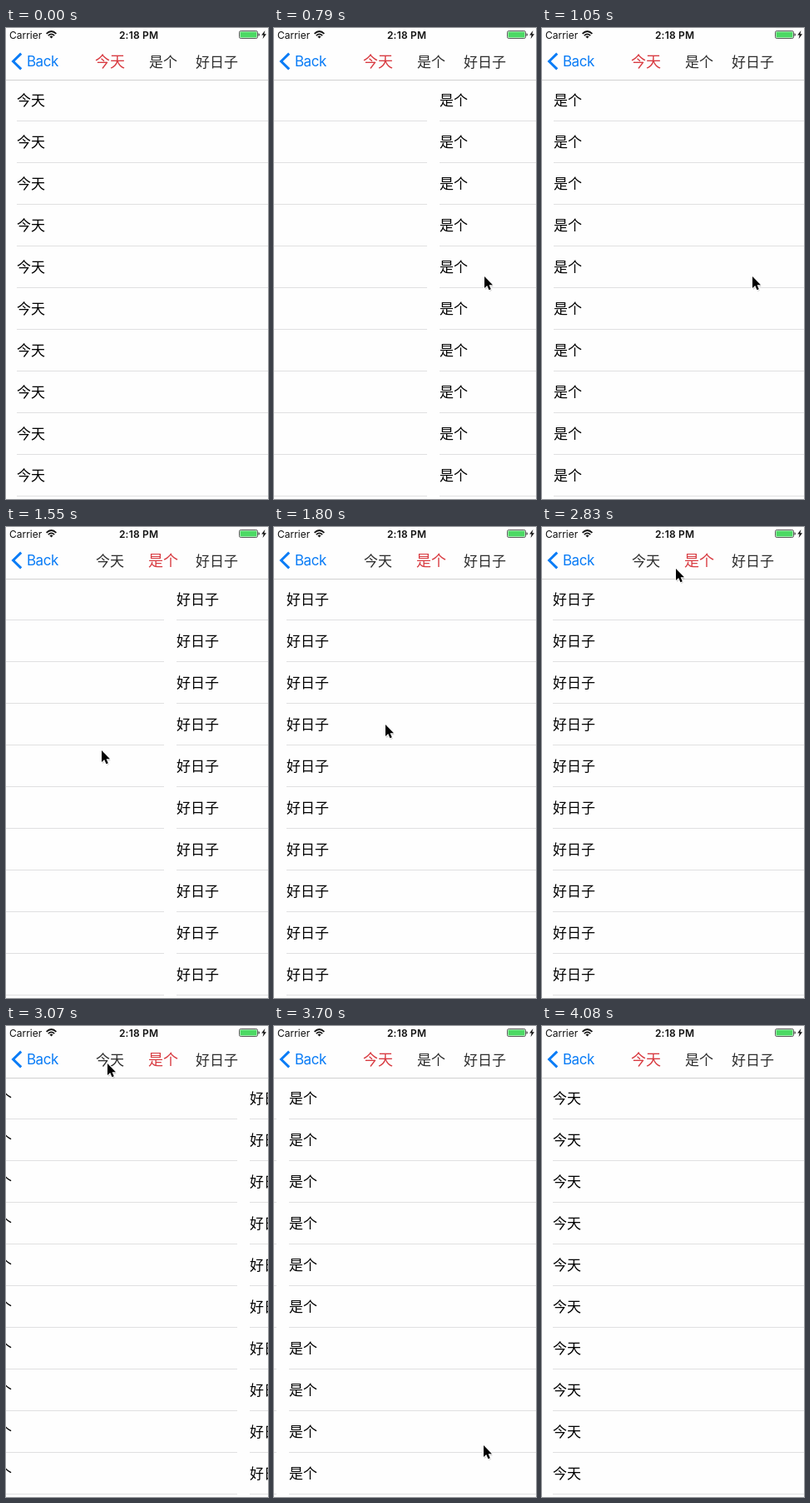
Write an HTML page that moves like this. It is 315x565 px and loops after 4630 ms.

```html
<!DOCTYPE html>
<html lang="zh-CN">
<head>
<meta charset="utf-8">
<title>Paged tabs</title>
<style>
  html, body { margin: 0; width: 100%; height: 100%; overflow: hidden; background: #fefefe; }
  svg { display: block; width: 315px; height: 565px; }
  text { font-family: Inter, Roboto, sans-serif; }
  .status { font-size: 12px; fill: #111; }
  .time { font-weight: 600; text-anchor: middle; letter-spacing: .2px; }
  .back { font-size: 17px; letter-spacing: -.5px; fill: #0a7cf6; }
  .tab, .row { font: 17px "Noto Sans CJK SC", "Noto Sans CJK", sans-serif; }
  .tab { text-anchor: middle; fill: #2d2d2d; }
  .tab.on { font-size: 18px; fill: #d83a40; }
  .rule { fill: #e0e0e1; }
</style>
</head>
<body>
<svg viewBox="0 0 315 565">
  <rect width="315" height="565" fill="#fefefe"/>
  <g id="pages"></g>
  <rect y="62" width="315" height="1" fill="#d0d0d0"/>

  <text class="status" x="4" y="12.5">Carrier</text>
  <g fill="none" stroke="#111" stroke-width="1.7">
    <path d="M48.6 6.8Q54.5 1.2 60.4 6.8"/>
    <path d="M50.8 9.1Q54.5 5.7 58.2 9.1"/>
  </g>
  <path d="M52.4 10.3Q54.5 8.6 56.6 10.3L54.5 12.6Z" fill="#111"/>
  <text class="status time" x="159.6" y="12.5">2:18 PM</text>
  <rect x="280.5" y="3.5" width="22" height="9" rx="1.8" fill="none" stroke="#333" stroke-width=".8"/>
  <rect x="281.5" y="4.5" width="20" height="7" rx=".8" fill="#4cd964"/>
  <path d="M303.5 6.2q1.4 .3 1.4 1.8t-1.4 1.8z" fill="#333"/>
  <path d="M311.4 3L307.2 8.6H309.7L308.6 13L313 7.3H310.4Z" fill="#111"/>

  <path d="M18.2 30.6L8.6 40L18.2 49.4" fill="none" stroke="#0a7cf6" stroke-width="3"/>
  <text class="back" x="25" y="46">Back</text>
  <g id="tabs"></g>

  <g id="cursor">
    <path d="M1 2V16L4 13.6L6.4 18L9 17L7 12.2H11Z" fill="#000" opacity=".16"/>
    <path d="M0 0V14L3.2 11L5.5 16.2L7.8 15.2L5.6 10.2H10Z" fill="#000"
          stroke="#fff" stroke-width="1.8" paint-order="stroke"/>
  </g>
</svg>
<script>
const LOOP = 4630, PAGE = 320, ROWS = 10;
const labels = ["今天", "是个", "好日子"];
const centers = [125, 189, 253.5];
const $ = id => document.getElementById(id);

$("tabs").innerHTML = labels.map((s, i) =>
  `<text class="tab" x="${centers[i]}" y="46.5">${s}</text>`).join("");

$("pages").innerHTML = labels.map((s, i) => {
  let rows = "";
  for (let r = 0; r < ROWS; r++) {
    const y = 62 + 50 * r;
    rows += `<text class="row" x="15" y="${y + 31}">${s}</text>` +
            `<rect class="rule" x="15" y="${y + 49}" width="305" height="1"/>`;
  }
  return `<g transform="translate(${i * PAGE - 2})">${rows}</g>`;
}).join("");

const linear = p => p;
const easeIn = p => p * p;
const easeOut = p => 1 - (1 - p) ** 3;
const easeInOut = p => (1 - Math.cos(Math.PI * p)) / 2;
const hold = () => 0;

// Keyframes: [time, values, easing towards the next key]
const scroll = [
  [0, [0], hold], [620, [0], easeIn], [790, [134], easeOut],
  [1080, [320], hold], [1250, [320], easeIn], [1370, [374], hold],
  [1550, [448], easeOut], [1850, [640], hold],
  [2851, [640], easeInOut], [3135, [320], hold],
  [3677, [320], easeInOut], [3961, [0], hold]
];
const pointer = [
  [0, [330, 390], hold], [90, [311, 382], hold], [150, [308, 382], hold],
  [440, [306, 370], linear], [620, [302, 306], easeIn], [740, [253, 298], hold],
  [1250, [253, 298], easeIn], [1370, [189, 285], hold],
  [1550, [115, 268], hold], [1680, [115, 268], easeInOut],
  [2070, [238, 69], hold], [2100, [232, 67], linear],
  [2210, [161, 50], hold], [2830, [161, 50], easeInOut],
  [3070, [122, 45], hold], [3480, [122, 45], easeInOut],
  [3700, [252, 503], easeOut], [3960, [261, 559], hold],
  [4020, [262, 560], hold], [4080, [330, 600], hold]
];
const active = [
  [0, [0], hold], [1080, [1], hold], [1850, [2], hold],
  [2410, [1], hold], [3270, [0], hold]
];

// Screen refreshes come in bursts: [first, last, count]
const ticks = [0];
for (const [a, b, n] of [
  [90, 150, 2], [440, 790, 9], [820, 960, 3], [990, 1080, 3], [1250, 1370, 4],
  [1550, 1550, 1], [1600, 2070, 14], [2100, 2210, 5], [2410, 2410, 1],
  [2830, 3070, 6], [3130, 3130, 1], [3270, 3270, 1], [3480, 3700, 6],
  [3720, 3960, 6], [4020, 4080, 2]
]) {
  for (let i = 0; i < n; i++) ticks.push(n > 1 ? a + (b - a) * i / (n - 1) : a);
}

function sample(track, t) {
  let i = track.length - 1;
  while (track[i][0] > t) i--;
  const [t0, from, ease] = track[i];
  const [t1, to] = track[i + 1] || [LOOP, from];
  const p = ease((t - t0) / (t1 - t0));
  return from.map((v, k) => Math.round(v + (to[k] - v) * p));
}

const tabs = [...$("tabs").children];
const start = performance.now();

function draw() {
  const now = (performance.now() - start) % LOOP;
  const t = ticks.findLast(k => k <= now);
  const [x] = sample(scroll, t), [on] = sample(active, t);
  $("pages").setAttribute("transform", `translate(${-x})`);
  $("cursor").setAttribute("transform", `translate(${sample(pointer, t)})`);
  tabs.forEach((tab, i) => tab.classList.toggle("on", i === on));
  requestAnimationFrame(draw);
}
draw();
</script>
</body>
</html>
```
